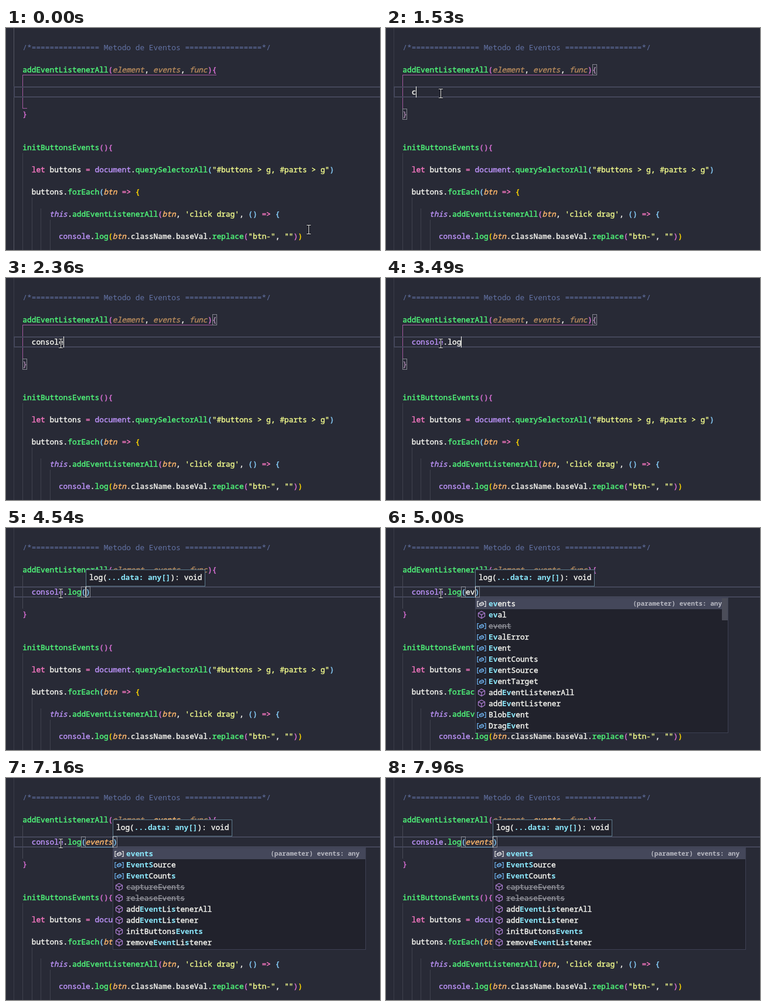
Write an HTML page with a canvas that moves like this. It is 638x380 px and loops after 8000 ms.

```html
<!DOCTYPE html>
<html lang="pt">
<head>
<meta charset="utf-8">
<style>
  html, body { margin: 0; height: 100%; overflow: hidden; background: #282a36; }
  canvas { display: block; }
</style>
</head>
<body>
<canvas id="stage" width="638" height="380"></canvas>
<script>
const ctx = document.getElementById('stage').getContext('2d');
const LOOP = 8000, CHAR = 7.7, LEFT = 12.9, ROW = 19, POPUP_W = 432, POPUP_TOP = 119;
const MONO = '"Noto Sans Mono", "DejaVu Sans Mono", monospace';

// Style letters: the first character of every code token
const COLORS = {
  c: '#6272a4', g: '#50fa7b', w: '#f8f8f2', p: '#ff79c6', v: '#bd93f9', V: '#bd93f9',
  O: '#ffb86c', D: '#b78a5c', s: '#f1fa8c', y: '#ffd700', m: '#da70d6', b: '#87cefa',
  M: '#ad8cb2', d: '#c9c9d4'
};
const ITALIC = 'VOD';

const CODE = [
  [2, 33, ['c/*=============== Metodo de Eventos =================*/']],
  [2, 204, ['ginitButtonsEvents', 'm(){']],
  [4, 242, ['plet ', 'wbuttons ', 'p= ', 'vdocument', 'w.', 'gquerySelectorAll', 'b(',
    's"#buttons > g, #parts > g"', 'b)']],
  [4, 280, ['wbuttons.', 'gforEach', 'b(', 'Obtn ', 'p=> ', 'y{']],
  [8, 318, ['Vthis', 'w.', 'gaddEventListenerAll', 'm(', 'Obtn', 'w, ', "s'click drag'", 'w, ',
    'b() ', 'p=> ', 'b{']],
  [10, 356, ['vconsole', 'w.', 'glog', 'y(', 'Obtn', 'w.className.baseVal.', 'greplace', 'm(',
    's"btn-"', 'w, ', 's""', 'm)', 'y)']]
];

// Suggestion lists: # method, ~ deprecated
const list = (detail, names) => ({ detail, rows: names.split(' ') });
const EVENT_TYPES = 'Event EventCounts EventSource EventTarget #addEventListenerAll #addEventListener BlobEvent DragEvent';
const CON = list('var console: Console',
  'console ConstantSourceNode ConvolverNode #confirm continue');
const DOT = list('(method) assert(): void',
  '#assert #clear #count #countReset #debug #dir #dirxml #error #group #groupCollapsed #groupEnd #info');
const LOG = list('(method) log(): void',
  '#log #timeLog #clear #groupCollapsed #table addEventListenerAll querySelectorAll buttons className replace');
const EV = list('(parameter) events: any', 'events #eval ~event EvalError ' + EVENT_TYPES);
const EVENT = list('var event: Event | undefined', '~event events ' + EVENT_TYPES + ' ErrorEvent CloseEvent');
const EVENTS = list('(parameter) events: any',
  'events EventSource EventCounts ~#captureEvents ~#releaseEvents #addEventListenerAll #addEventListener #initButtonsEvents #removeEventListener');

// Time, text before the caret, open list
const KEYS = [
  [670, ''], [1530, 'c'], [1640, 'co', CON], [1750, 'con', CON], [1860, 'cons', CON], [1960, 'conso', CON],
  [2360, 'console'], [2860, 'console.', DOT], [3130, 'console.l', LOG], [3300, 'console.lo', LOG],
  [3490, 'console.log'], [4300, 'console.log('], [4820, 'console.log(e', EV], [4960, 'console.log(ev', EV],
  [5090, 'console.log(eve', EV], [5180, 'console.log(even', EVENT], [5490, 'console.log(event', EVENT],
  [6680, 'console.log(events', EVENTS]
];

const colX = col => LEFT + col * CHAR;

function rect(color, x, y, w, h) {
  ctx.fillStyle = color;
  ctx.fillRect(x, y, w, h);
}

function frame(color, x, y, w, h) {
  ctx.strokeStyle = color;
  ctx.lineWidth = 1;
  ctx.strokeRect(x + .5, y + .5, w - 1, h - 1);
}

function path(color, width, points, close) {
  ctx.strokeStyle = color;
  ctx.lineWidth = width;
  ctx.beginPath();
  points.forEach(([x, y]) => ctx.lineTo(x, y));
  if (close) ctx.closePath();
  ctx.stroke();
}

// A hairline outline gives regular letters a medium weight
function text(str, x, y, color, style = '', size = 12.83) {
  ctx.font = `${style} ${size}px ${MONO}`;
  ctx.fillStyle = ctx.strokeStyle = color;
  ctx.fillText(str, x, y + 5);
  if (style !== 'bold' && color !== COLORS.c) {
    ctx.lineWidth = .4;
    ctx.strokeText(str, x, y + 5);
  }
}

function tokens(col, y, parts) {
  for (const part of parts) {
    const str = part.slice(1), italic = ITALIC.includes(part[0]);
    text(str, colX(col) - (italic ? .5 : 0), y, COLORS[part[0]], italic ? 'italic' : '');
    col += str.length;
  }
}

function guides(t) {
  rect(t < 1530 ? '#555763' : '#3b3d49', 13, 0, 1, 380);
  [[28, 214], [44, 290], [59, 309], [75, 328]].forEach(([x, y]) => rect('#3f414d', x, y, 1, 380 - y));
  if (t < 4300) {
    rect('#a35a9f', 28, 80, t < 670 ? 331 : 324, 1);
    rect('#a35a9f', 28, 81, 1, 57);
    if (t < 670) rect('#a35a9f', 28, 137, 8, 1);
  } else {
    rect('#4a4c58', 28, 81, 1, 57);
  }
  ctx.strokeStyle = '#44475a';
  ctx.lineWidth = 2;
  ctx.strokeRect(14, 101, 640, 17);
}

function bracketBox(col, y) {
  frame('#85878f', Math.round(colX(col)), y - 9, 8, 19);
}

function typedLine(t, typed) {
  const [, obj, log = '', arg] = typed.match(/^([a-z]*)(\.[a-z]*)?(?:\(([a-z]*))?$/);
  const parts = [(t < 2460 ? 'w' : 'v') + obj];
  if (log) parts.push('w.', (t < 3620 ? 'w' : 'g') + log.slice(1));
  if (arg !== undefined) {
    const struck = arg === 'event' && t >= 5900;
    parts.push('b(', (t >= 7090 ? 'O' : struck ? 'd' : 'w') + arg, 'b)');
    rect('#6799b9', Math.round(colX(15)), 118, (arg.length + 1) * CHAR, 1);
    bracketBox(15, 109);
    bracketBox(16 + arg.length, 109);
    tokens(4, 109, parts);
    if (struck) rect(COLORS.d, colX(16), 110, 5 * CHAR, 1);
  } else {
    tokens(4, 109, parts);
  }
}

function icon(x, y, method, selected) {
  if (method) {
    const c = '#b180d7';
    path(c, 1.2, [[x, y - 6], [x + 5.5, y - 3], [x + 5.5, y + 3], [x, y + 6], [x - 5.5, y + 3], [x - 5.5, y - 3]], true);
    path(c, 1.2, [[x - 5.5, y - 3], [x, y], [x + 5.5, y - 3]]);
    path(c, 1.2, [[x, y], [x, y + 6]]);
    return;
  }
  const c = selected ? '#f0f0f0' : '#75beff';
  for (const s of [-1, 1]) {
    path(c, 1.2, [[x + s * 4.5, y - 4], [x + s * 7, y - 4], [x + s * 7, y + 5], [x + s * 4.5, y + 5]]);
  }
  path(c, 1.2, [[x - 3.5, y], [x + 1, y - 2.5], [x + 3.5, y - 1], [x + 3.5, y + 1.5], [x - 1, y + 3.5], [x - 3.5, y + 2.5]], true);
  path(c, 1, [[x - 3.5, y], [x - 1, y + 1], [x + 3.5, y - 1]]);
}

// Matched letters of the typed word stand out
function label(name, word, x, y) {
  const low = name.toLowerCase();
  let at = word ? low.indexOf(word.slice(0, 2)) : -1, hit = 0;
  [...name].forEach((ch, i) => {
    const on = at >= 0 && i >= at && hit < word.length && low[i] === word[hit];
    if (on) hit++;
    text(ch, x + i * CHAR, y, on ? '#8be9fd' : '#f8f8f2', on ? 'bold' : '');
  });
}

function popup(x, { detail, rows }, word, mouse) {
  const h = rows.length * ROW + 4, long = rows.length > 11;
  const inner = POPUP_W - (long ? 11 : 2);
  rect('#21222c', x, POPUP_TOP, POPUP_W, h);
  rows.forEach((row, i) => {
    const y = POPUP_TOP + 10 + i * ROW, name = row.replace(/[~#]/g, '');
    const over = mouse[0] > x && mouse[0] < x + POPUP_W && Math.abs(mouse[1] - y) < ROW / 2;
    if (!i || over) rect(i ? '#343642' : '#44475a', x + 1, y - 9, inner, ROW);
    icon(x + 11, y + .5, row.includes('#'), !i);
    if (row[0] === '~') {
      text(name, x + 23, y, '#92939b');
      rect('#92939b', x + 23, y + 1, name.length * CHAR, 1);
    } else {
      label(name, word, x + 23, y);
    }
  });
  ctx.textAlign = 'right';
  text(detail, x + 421, POPUP_TOP + 9, '#b9bac3', 'bold', 11);
  ctx.textAlign = 'left';
  if (long) rect('#4b4d59', x + 421, POPUP_TOP + 1, 10, 38);
  frame('#3d4052', x, POPUP_TOP, POPUP_W, h);
}

function signature(x) {
  rect('#21222c', x, 71, 204, 29);
  frame('#5d7a8c', x, 71, 204, 29);
  text('log(', x + 6, 84, COLORS.w);
  text('...data: any[]', x + 6 + 4 * CHAR, 84, '#8be9fd', 'bold');
  text('): void', x + 6 + 18 * CHAR, 84, COLORS.w);
}

function mouseAt(t) {
  const k = Math.min(1, Math.max(0, (t - 30) / 620)), e = k * k * (3 - 2 * k);
  const out = Math.max(0, (t - 7690) / 260);
  return [516 - 423 * e + 200 * out, 345 - 233 * e + 290 * out];
}

function ibeam([x, y]) {
  x = Math.round(x) + .5;
  y = Math.round(y);
  for (const [c, w] of [['#15161c', 3], ['#e8e8e8', 1]]) {
    path(c, w, [[x, y - 7], [x, y + 7]]);
    for (const s of [-7.5, 7.5]) path(c, w, [[x - 3.5, y + s], [x + 3.5, y + s]]);
  }
}

function draw(t) {
  const [since, typed, open] = KEYS.filter(k => k[0] <= t).pop() || [Infinity, ''];
  const mouse = mouseAt(t), caret = Math.round(colX(4 + typed.length));
  rect('#282a36', 0, 0, 638, 380);
  guides(t);
  CODE.forEach(line => tokens(...line));
  const boxed = t >= 670 && t < 4300, brace = boxed ? 'M' : 'm';
  tokens(2, 71, ['gaddEventListenerAll', 'm(', 'Delement', 'w, ', (t < 7090 ? 'D' : 'O') + 'events', 'w, ',
    'Dfunc', 'm)', brace + '{']);
  tokens(2, 147, [brace + '}']);
  if (boxed) {
    bracketBox(44, 71);
    bracketBox(2, 147);
  }
  typedLine(t, typed);
  if (t >= since && Math.floor((t - since) / 500) % 2 === 0) rect('#f8f8f0', caret, 100, 1, 19);
  if (t >= 4540) signature(caret);
  if (open) popup(caret, open, typed.match(/[a-z]*$/)[0], mouse);
  ibeam(mouse);
}

const start = performance.now();
function tick() {
  draw((performance.now() - start) % LOOP);
  requestAnimationFrame(tick);
}
tick();
</script>
</body>
</html>
```
